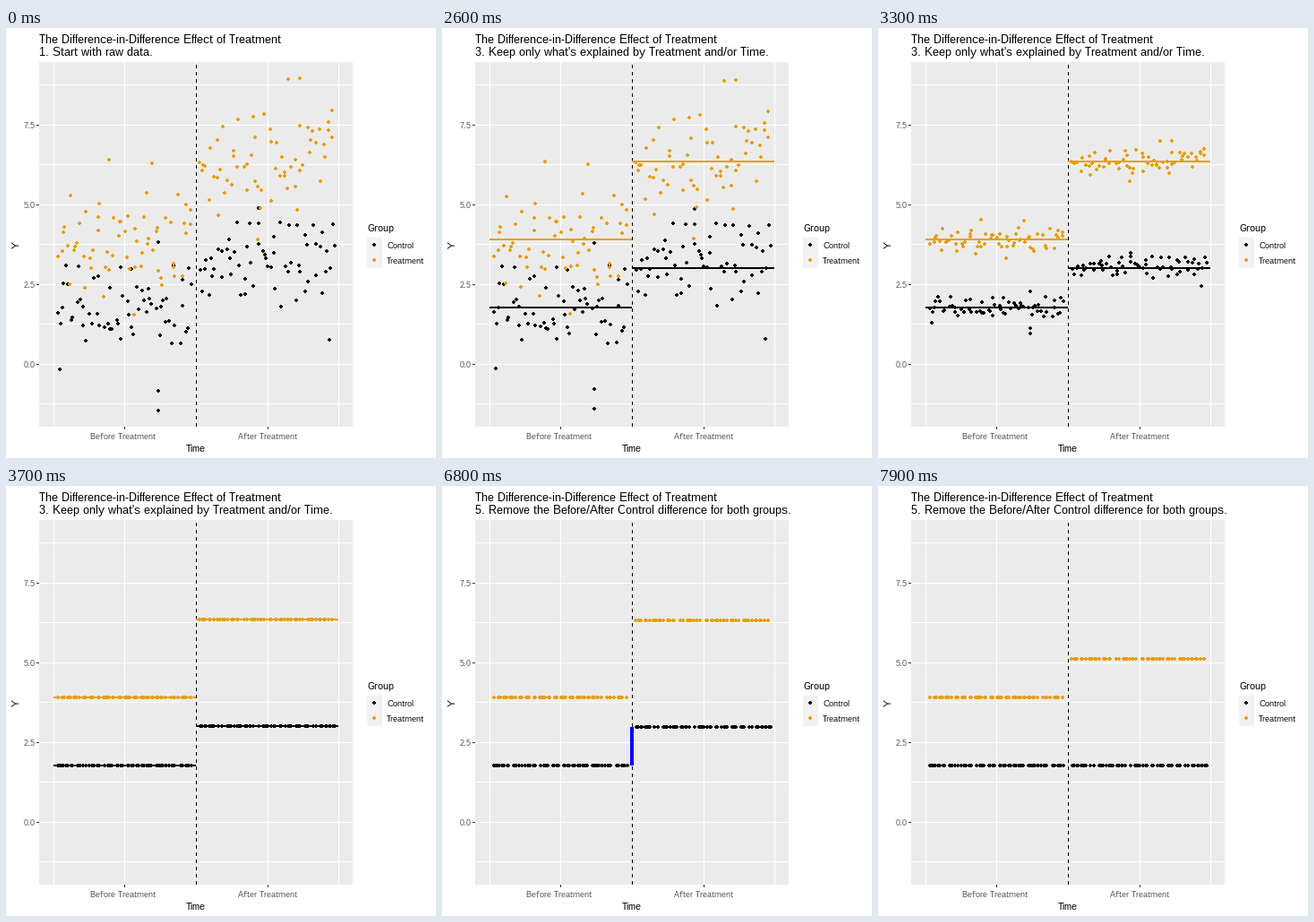
These frames come from a looping animation (480 by 480 pixels, 8000 ms). A matplotlib script:

```python
import numpy as np
import matplotlib.pyplot as plt
from matplotlib.animation import FuncAnimation
from matplotlib.collections import PolyCollection
from matplotlib.patches import Rectangle

SIZE, DPI, STEP, LOOP = 480, 80, 100, 8000
BLACK, GOLD, GREY = "black", "#E69F00", "#4D4D4D"

plt.rcParams.update({
    "font.family": "Liberation Sans",
    "text.hinting": "native",
    "text.hinting_factor": 1,
})

fig = plt.figure(figsize=(SIZE / DPI, SIZE / DPI), dpi=DPI, facecolor="white")
ax = fig.add_axes([0, 0, 1, 1])
ax.set(xlim=(0, SIZE), ylim=(SIZE, 0))
ax.axis("off")


def box(x0, y0, x1, y1, color, z=1):
    patch = Rectangle((x0, y0), x1 - x0, y1 - y0, fc=color, lw=0,
                      antialiased=False, zorder=z)
    ax.add_patch(patch)
    return patch


def label(x, y, text, px, color=BLACK, ha="left", **kw):
    return ax.text(x, y, text, fontsize=px * 72 / DPI, color=color,
                   ha=ha, va="baseline", **kw)


# Panel, grid and axes
LEFT, TOP, RIGHT, BOTTOM = 37, 38, 387, 445
START, MID, END = 53, 212, 371


def y_px(value):
    return int(375.4 - 35.64 * value)


box(LEFT, TOP, RIGHT, BOTTOM, "#EBEBEB")
for v in np.arange(-1.25, 9, 1.25):
    box(LEFT, y_px(v), RIGHT, y_px(v) + 1, "white")
for x in (START, 132, MID, 292, END):
    box(x, TOP, x + 1, BOTTOM, "white")

for v in (0, 2.5, 5, 7.5):
    box(LEFT - 3, y_px(v), LEFT, y_px(v) + 1, "#333333")
    label(33, y_px(v) + 4, f"{v:.1f}", 9, GREY, "right")
for x in (132, 292):
    box(x, BOTTOM, x + 1, BOTTOM + 3, "#333333")
label(131, 459, "Before Treatment", 9, GREY, "center")
label(292, 459, "After Treatment", 9, GREY, "center")
label(MID, 473, "Time", 11, ha="center")
label(15, 242, "Y", 11, ha="center", rotation=90, rotation_mode="anchor")

for y in range(BOTTOM, TOP, -8):
    box(MID, max(y - 4, TOP), MID + 1, y, BLACK, 3)

# Crisp four-pixel dot with its corners cut
CORNER = np.array([(1, 2), (1, 1), (2, 1)])
DOT = np.vstack([CORNER, CORNER[::-1] * (1, -1), -CORNER, CORNER[::-1] * (-1, 1)])


def dots(pts):
    return np.rint(pts)[:, None, :] + DOT


def dot_layer(pts, color):
    layer = PolyCollection(dots(pts), facecolors=color, edgecolors="none",
                           linewidths=0, antialiaseds=False, zorder=4)
    layer.set_snap(False)
    ax.add_collection(layer, autolim=False)
    return layer


class Group:
    """Random dots around a mean level, plus a few outliers, and the mean line."""

    def __init__(self, color, mean, spread, after, outliers):
        self.mean, self.after = mean, after
        lo, hi = (216, 367) if after else (58, 207)
        n = 60
        x = np.linspace(lo, hi, n) + rng.uniform(-3, 3, n)
        z = rng.normal(size=10 * n)
        y = mean + spread * z[abs(z) < 1.7][:n]
        self.pts = np.vstack([np.column_stack([x.clip(lo, hi), y]), outliers])
        self.layer = dot_layer(self.pts, color)
        x0, x1 = (MID, END) if after else (START, MID)
        self.line = box(x0, mean - 1, x1, mean + 1, color, 5)

    def place(self, squeeze, drop):
        x, y = self.pts.T
        y = self.mean + (y - self.mean) * squeeze + drop * self.after
        self.layer.set_verts(dots(np.column_stack([x, y])))


rng = np.random.default_rng(12)
groups = [
    Group(BLACK, 312, 30, False, [(60, 381), (170, 427), (170, 405), (170, 239)]),
    Group(BLACK, 268, 31, True, [(361, 348), (282, 201)]),
    Group(GOLD, 236, 38, False, [(115, 147), (163, 151), (143, 320)]),
    Group(GOLD, 149, 36, True, [(315, 57), (328, 56), (281, 236)]),
]

# Legend
label(403, 227, "Group", 11)
for y, name, color in ((242, "Control", BLACK), (259, "Treatment", GOLD)):
    box(403, y - 8, 420, y + 9, "#F2F2F2")
    dot_layer(np.array([(411, y)]), color)
    label(425, y + 4, name, 9)

# Blue gap between the control means
BASE, GAP = 312, 44
gap = box(MID - 2, BASE - GAP, MID + 2, BASE, "blue", 6)

label(LEFT, 17, "The Difference-in-Difference Effect of Treatment", 13)
subtitle = label(LEFT, 31, "", 13)
STEPS = [
    (0, "1. Start with raw data."),
    (500, "2. Figure out what differences in Y are explained by Treatment and/or Time."),
    (2600, "3. Keep only what's explained by Treatment and/or Time."),
    (4700, "4. See how Control changed over Time."),
    (6800, "5. Remove the Before/After Control difference for both groups."),
]


def ease(t, start):
    """Sine in-out over twelve steps, the first one already under way."""
    k = np.clip((t - start) / STEP + 1, 0, 12) / 12
    return (1 - np.cos(np.pi * k)) / 2


def update(i):
    t = i * STEP
    subtitle.set_text([text for start, text in STEPS if t >= start][-1])

    drop = GAP * ease(t, 6800)
    for g in groups:
        g.place(1 - ease(t, 2600), drop)
        g.line.set_visible(900 <= t < 4700)

    height = round(GAP - drop)
    gap.set_y(BASE - height)
    gap.set_height(height)
    gap.set_visible(t >= 5100 and height > 0)


anim = FuncAnimation(fig, update, frames=LOOP // STEP, interval=STEP,
                     init_func=lambda: update(0), repeat=True, repeat_delay=0)
plt.show()
```
